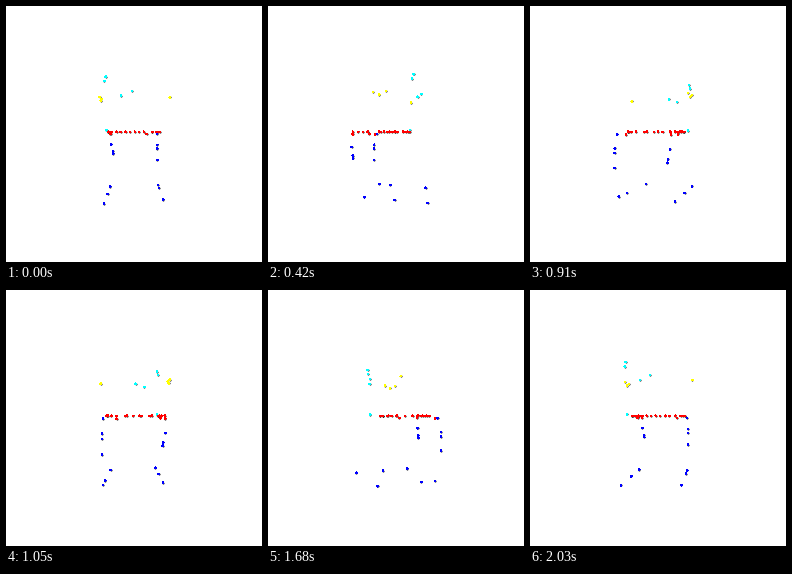
Write a matplotlib script that moves like this. It is 256 px wide and 256 px high and loops after 2.1 s.

```python
import numpy as np
import matplotlib.pyplot as plt
from matplotlib.animation import FuncAnimation

SIZE, FRAMES, STEP = 256, 30, 70
CX, CY = 128, 126.5      # turning axis and horizon on screen
DIST = 220               # camera distance
TOP, RIM, FLOOR = -0.7, 1.8, 59.5

# Points are (x across, z away from the camera, h down).


def line(start, end, n, ease=1):
    """n points from start to end; ease > 1 crowds them near the start."""
    t = np.linspace(0, 1, n)[:, None] ** ease
    return np.array(start) + t * (np.array(end) - np.array(start))


def curve(x, z, h):
    return np.column_stack(np.broadcast_arrays(x, z, h))


def seat():
    side_z = np.linspace(24, 7, 4)
    back_x = np.linspace(18, -25, 6)
    return [
        line((-26, 34, TOP), (6, 34, TOP), 4),
        curve(26.5 - 0.022 * (side_z - 7) ** 2, side_z, TOP),
        curve(back_x, 0.018 * (back_x + 5) ** 2 - 14.5, TOP),
        line((-25, -7, TOP), (-25, 8, TOP), 4),
        [(-25, 19, TOP), (-25, 12, RIM), (-26.5, 34, RIM), (14.6, 36, RIM)],
    ]


def legs():
    return [
        line((-24, 35, 24.4), (-26.3, 35, 13.7), 3, 2),
        line((27, 35.5, 14.3), (27, 35.5, 31.9), 3, 2),
        line((-25, -36, FLOOR), (-26, 22, FLOOR), 3),
        line((27, 29, FLOOR), (26, -25, FLOOR), 3, 2),
        [(26.5, 32, RIM)],
    ]


def arms():
    k = np.arange(-1, 2)
    return [curve(-34, 4 + 6 * k, -32.5 - 2.7 * abs(k)), [(34.5, -7, -34)]]


def back():
    return [
        line((-25.3, -24, -49.8), (-26.5, -23, -46), 2),
        line((-1.8, -26, -36.6), (-11.4, -24.5, -32.8), 2),
        [(-25, -21, -2)],
    ]


parts = [("red", seat()), ("blue", legs()), ("yellow", arms()),
         ("cyan", back())]
groups = [(color, np.vstack(strokes)) for color, strokes in parts]
points = np.vstack([group for _, group in groups])
colors = np.array([color for color, group in groups for _ in group])


def project(angle):
    x, z, h = points.T
    c, s = np.cos(angle), np.sin(angle)
    depth = x * s + z * c
    scale = DIST / (DIST + depth)
    xy = np.column_stack([CX + (x * c - z * s) * scale, CY + h * scale])
    return xy, np.argsort(-depth)


fig = plt.figure(figsize=(SIZE / 72, SIZE / 72), dpi=72, facecolor="white")
ax = fig.add_axes([0, 0, 1, 1])
ax.set(xlim=(0, SIZE), ylim=(SIZE, 0))
ax.axis("off")


def dots(diameter, color):
    return ax.scatter(*project(0)[0].T, s=diameter ** 2, c=color,
                      linewidths=0, antialiased=False)


shade = dots(2.0, "black")
fill = dots(1.6, colors)


def update(i):
    xy, order = project(2 * np.pi * i / FRAMES)
    shade.set_offsets(xy)
    fill.set_offsets(xy[order])
    fill.set_facecolor(colors[order])
    return shade, fill


anim = FuncAnimation(fig, update, frames=FRAMES, interval=STEP,
                     repeat=True, repeat_delay=0)
plt.show()
```
